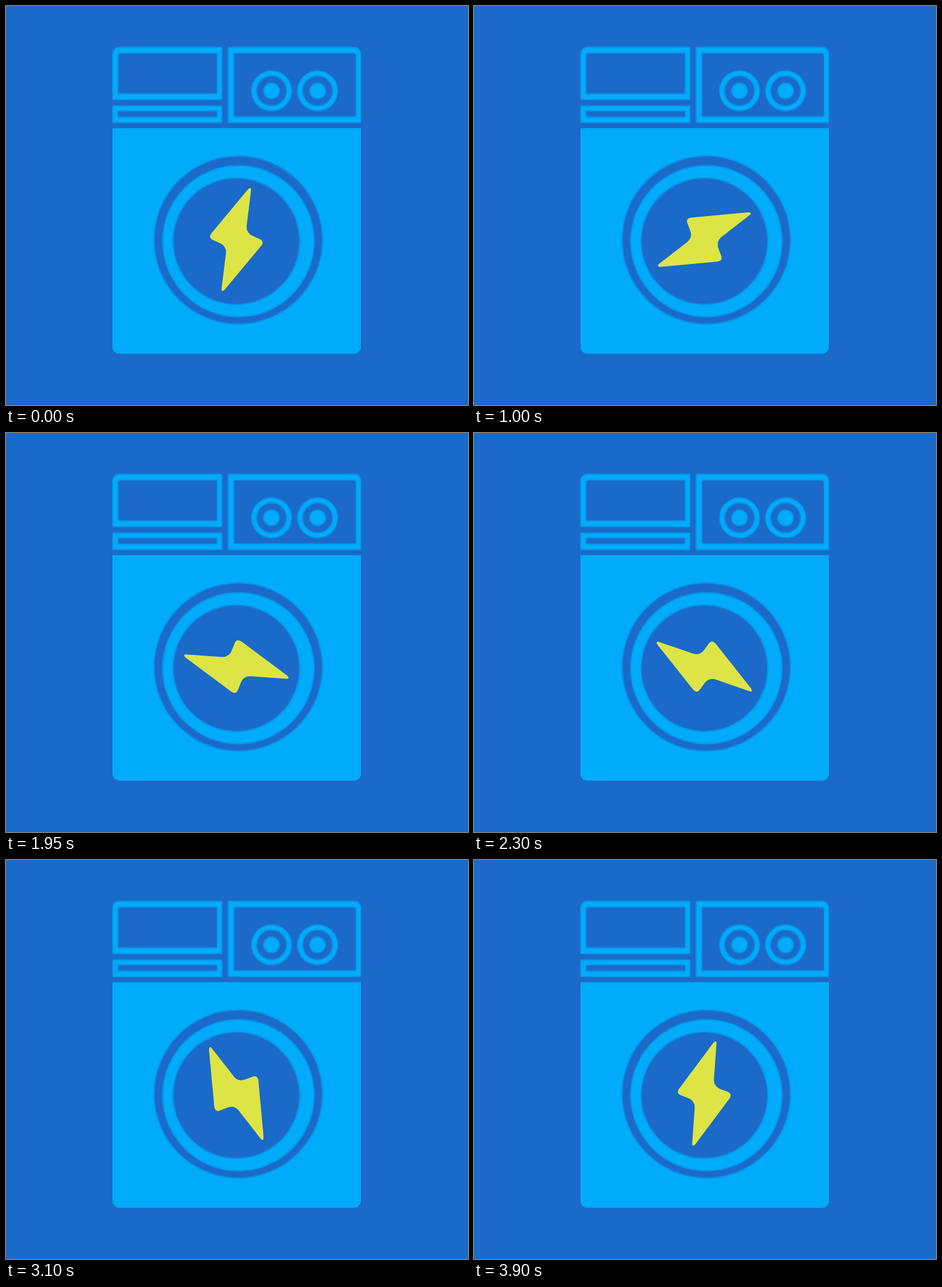
Recreate the animation shown at these times as an HTML page with a canvas. Size 742 px wide and 642 px high, loop 3950 ms.

```html
<!DOCTYPE html>
<html lang="en">
<head>
<meta charset="utf-8">
<title>Washing machine</title>
<style>
  html, body { margin: 0; width: 100%; height: 100%; overflow: hidden; background: #1b69c8; }
  canvas { display: block; }
</style>
</head>
<body>
<canvas id="stage" width="742" height="642"></canvas>
<script>
const ctx = document.getElementById('stage').getContext('2d');
const DARK = '#1b69c8', LIGHT = '#00abf9', YELLOW = '#dde546';
const LOOP = 3950, SLOT = 50, HOLD = 70;

function box(color, left, top, right, bottom, radii = 0) {
  ctx.fillStyle = color;
  ctx.beginPath();
  ctx.roundRect(left, top, right - left, bottom - top, radii);
  ctx.fill();
}

function disc(color, x, y, radius) {
  ctx.fillStyle = color;
  ctx.beginPath();
  ctx.arc(x, y, radius, 0, Math.PI * 2);
  ctx.fill();
}

function dial(x, y) {
  disc(LIGHT, x, y, 32.5);
  disc(DARK, x, y, 24);
  disc(LIGHT, x, y, 13);
}

function drawMachine() {
  box(DARK, 0, 0, 742, 642);
  box(LIGHT, 171, 196.5, 570, 559.5, [0, 0, 11, 11]);

  ctx.filter = 'blur(0.8px)';
  box(LIGHT, 171, 66, 347, 151, [11, 0, 0, 0]);
  box(DARK, 180, 76, 339, 141, [4, 0, 0, 0]);
  box(LIGHT, 171, 160.5, 347, 188);
  box(DARK, 180, 169, 339, 178.5);
  box(LIGHT, 356.5, 66, 570, 188, [0, 11, 0, 0]);
  box(DARK, 366, 76, 562, 178, [0, 4, 0, 0]);
  dial(426.5, 136.5);
  dial(500.5, 136.5);

  disc(DARK, 373, 376.5, 135);
  disc(LIGHT, 373.2, 378.5, 122);
  disc(DARK, 370, 378.5, 101.5);
  ctx.filter = 'none';
}

// The bolt is point-symmetric, so one half is traced twice with opposite signs.
function drawBolt(angle) {
  ctx.save();
  ctx.translate(369.9, 375.8);
  ctx.rotate(angle * Math.PI / 180);
  ctx.beginPath();
  for (const s of [1, -1]) {
    ctx.lineTo(18.5 * s, -80.5 * s);
    ctx.quadraticCurveTo(23.8 * s, -85.5 * s, 23.8 * s, -80 * s);
    ctx.lineTo(16.5 * s, -21 * s);
    ctx.quadraticCurveTo(16 * s, -10 * s, 27 * s, -5.5 * s);
    ctx.lineTo(37 * s, -1 * s);
    ctx.quadraticCurveTo(45.5 * s, 2.5 * s, 40 * s, 10 * s);
  }
  ctx.closePath();
  ctx.fillStyle = YELLOW;
  ctx.fill();
  ctx.restore();
}

// Three degrees per step, slightly quicker around the loop point.
function boltAngle(step) {
  if (step < 8) return step * 27 / 8;
  if (step < 49) return 3 * (step + 1);
  return 150 + (step - 49) * 27 / 7;
}

let shown = -1;
function render(now) {
  const slot = Math.floor((now % LOOP) / SLOT) * SLOT;
  const step = Math.floor((slot + 20) / HOLD);
  if (step !== shown) {
    shown = step;
    drawMachine();
    drawBolt(boltAngle(step));
  }
}

const start = performance.now();
function tick() {
  render(performance.now() - start);
  requestAnimationFrame(tick);
}
tick();
</script>
</body>
</html>
```
